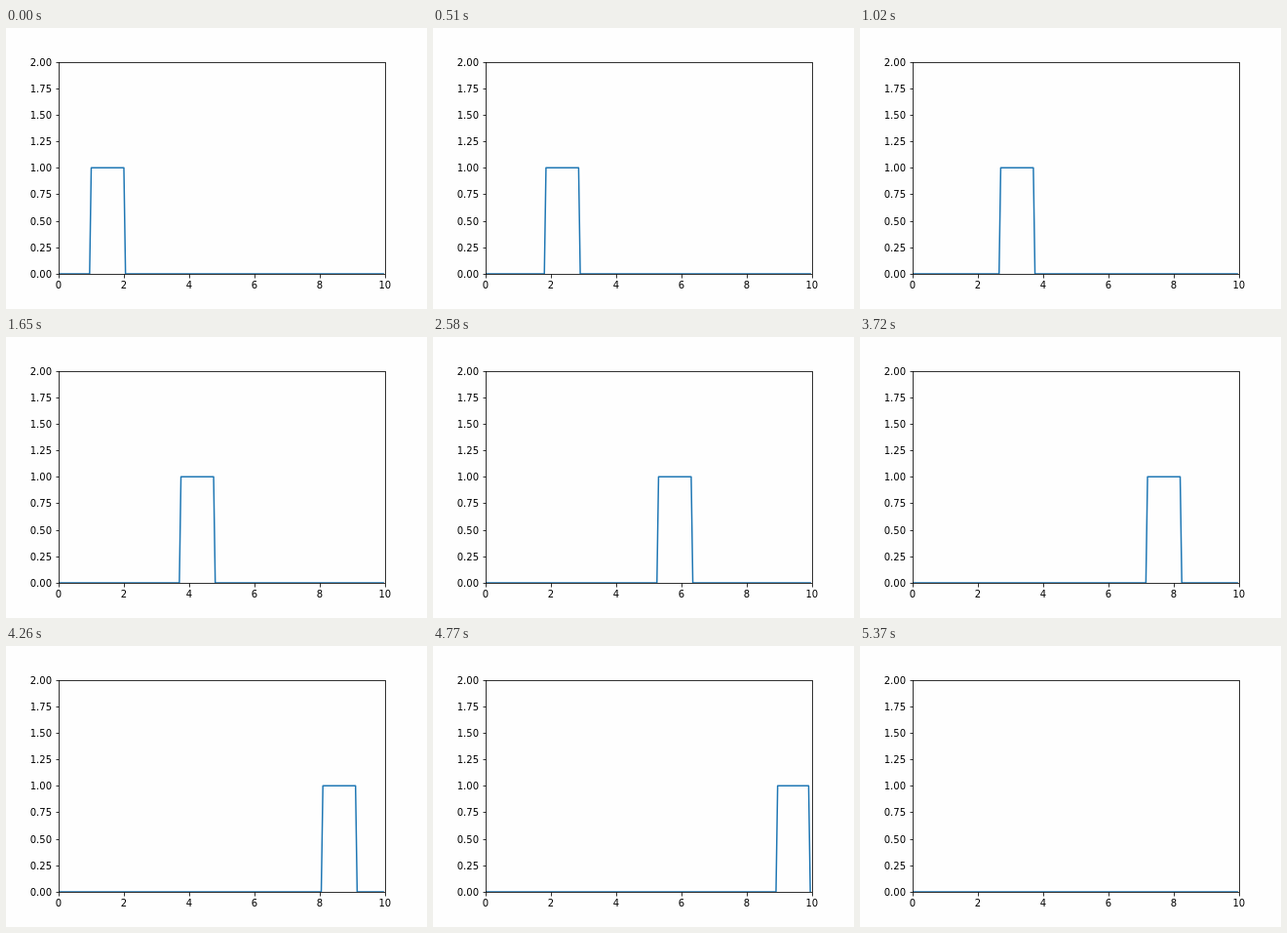
Write an HTML page that moves like this. It is 432 px wide and 288 px high and loops after 8 s.

```html
<!DOCTYPE html>
<html lang="en">
<head>
<meta charset="utf-8">
<title>Travelling square pulse</title>
<style>
  html, body { margin: 0; width: 100%; height: 100%; overflow: hidden; background: #fefefe; }
  svg { display: block; width: 432px; height: 288px; }
  text { font: 10px "DejaVu Sans", Verdana, sans-serif; fill: #000; }
  .axis { fill: none; stroke: #000; stroke-width: 0.8; }
  .wave { fill: none; stroke: #1f77b4; stroke-width: 1.5; stroke-linejoin: round; stroke-linecap: square; }
</style>
</head>
<body>
<svg viewBox="0 0 432 288">
  <clipPath id="plot"><rect x="54" y="35" width="335" height="217"/></clipPath>
  <polyline id="wave" class="wave" clip-path="url(#plot)"/>
  <g id="ticks"></g>
  <rect class="axis" x="54.5" y="35.5" width="335" height="217"/>
</svg>
<script>
  const LOOP = 8000, STEP_MS = 30, LAST_STEP = 179;
  const DX = 0.05, LAST = 199, WIDTH = 20;
  const wave = document.getElementById('wave');
  const ticks = document.getElementById('ticks');
  const px = x => 54 + x * 33.48;
  const py = y => 252 - y * 108.72;

  function add(tag, attrs, text = '') {
    const el = document.createElementNS('http://www.w3.org/2000/svg', tag);
    for (const key in attrs) el.setAttribute(key, attrs[key]);
    el.textContent = text;
    ticks.append(el);
  }

  for (let v = 0; v <= 10; v += 2) {
    const x = Math.round(px(v));
    add('path', { class: 'axis', d: `M${x + 0.5} 252.5v4` });
    add('text', { x: px(v), y: 267, 'text-anchor': 'middle' }, v);
  }
  for (let v = 0; v <= 2; v += 0.25) {
    const y = Math.round(py(v));
    add('path', { class: 'axis', d: `M54.5 ${y + 0.5}h-3` });
    add('text', { x: 47, y: y + 4, 'text-anchor': 'end' }, v.toFixed(2));
  }

  // The pulse moves one grid cell per step; the last grid point stays at zero.
  function draw(t) {
    const step = Math.min(LAST_STEP, Math.floor(t / STEP_MS));
    const left = WIDTH + step;
    const right = Math.min(left + WIDTH, LAST - 1);
    const pulse = left < LAST
      ? [[left - 1, 0], [left, 1], [right, 1], [right + 1, 0]]
      : [];
    const points = [[0, 0], ...pulse, [LAST, 0]];
    wave.setAttribute('points', points.map(([i, u]) => `${px(i * DX)},${py(u)}`).join(' '));
  }

  const start = performance.now();
  function tick() {
    draw((performance.now() - start) % LOOP);
    requestAnimationFrame(tick);
  }
  tick();
</script>
</body>
</html>
```
